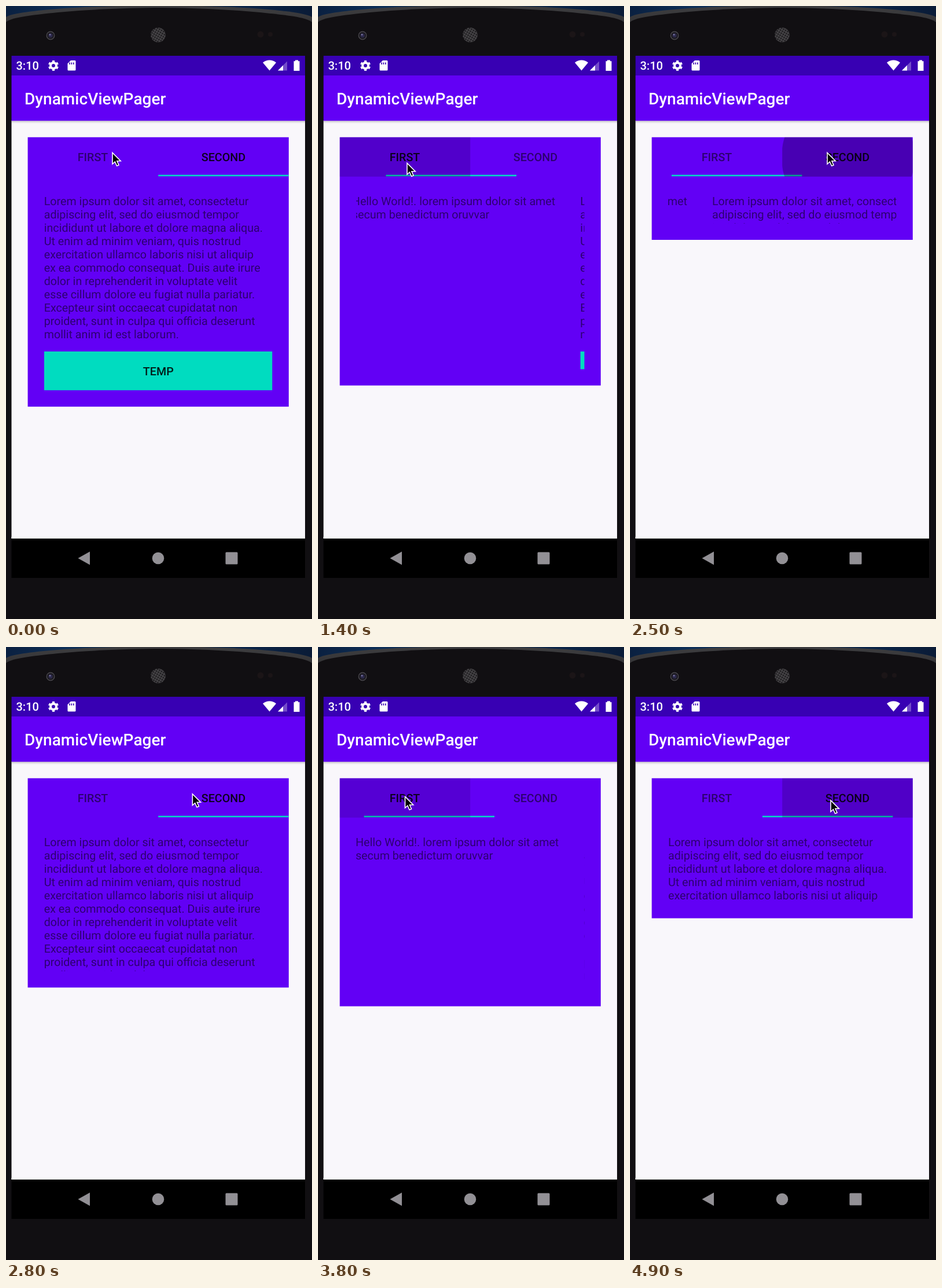
Animation, 529 px wide and 1059 px high, one loop 5000 ms. Source, as an HTML page:

```html
<!DOCTYPE html>
<html lang="en">
<head>
<meta charset="utf-8">
<title>Dynamic pager</title>
<style>
  html, body { margin: 0; width: 100%; height: 100%; overflow: hidden; background: #110f12; }
  svg { display: block; width: 100vw; height: 100vh; }
  text { font-family: Roboto, sans-serif; font-size: 19.7px; text-rendering: geometricPrecision; }
  .medium { font-weight: 500; }
  .body { fill: #000; fill-opacity: .54; }
</style>
</head>
<body>
<svg viewBox="0 0 529 1059">
  <defs>
    <linearGradient id="sky">
      <stop offset="0" stop-color="#0a2040"/><stop offset=".2" stop-color="#0e3058"/>
      <stop offset=".8" stop-color="#0b2548"/><stop offset="1" stop-color="#0a1b36"/>
    </linearGradient>
    <linearGradient id="rim" x2="0" y2="1">
      <stop offset="0" stop-color="#3e3e40"/><stop offset="1" stop-color="#2b2a2d"/>
    </linearGradient>
    <linearGradient id="shadow" x2="0" y2="1">
      <stop offset="0" stop-opacity=".2"/><stop offset="1" stop-opacity="0"/>
    </linearGradient>
    <pattern id="mesh" width="4" height="4" patternUnits="userSpaceOnUse" patternTransform="rotate(30)">
      <rect width="4" height="4" fill="#454346"/><circle cx="2" cy="2" r="1.3" fill="#161517"/>
    </pattern>
    <clipPath id="pagerClip"><rect id="pagerBox" x="66" y="323" width="394.5"/></clipPath>
    <clipPath id="tabClip"><rect id="tabBox" y="226.7" width="225.6" height="68"/></clipPath>
  </defs>

  <!-- device -->
  <rect width="529" height="30" fill="url(#sky)"/>
  <path d="M0 19C12 12 50 8 100 4Q180 -1 264 -1T429 4C479 8 517 12 529 19V60H0Z" fill="url(#rim)"/>
  <path d="M0 28C8 20 40 16 90 11Q180 3 264 3T439 11C489 16 521 20 529 28V1059H0Z" fill="#110f12"/>
  <circle cx="77" cy="51" r="6.8" fill="#1d1b22" stroke="#504e53" stroke-width="1.2"/>
  <circle cx="77" cy="51" r="3.6" fill="#2d2a4c"/>
  <circle cx="76" cy="49.5" r="1.3" fill="#8480ae"/>
  <circle cx="263" cy="50" r="12.8" fill="url(#mesh)"/>
  <g fill="#1b1517"><circle cx="440" cy="49" r="5.5"/><circle cx="457" cy="49" r="4"/></g>

  <!-- screen -->
  <rect x="9.5" y="86" width="507.5" height="902"/>
  <rect x="9.5" y="198" width="507.5" height="722" fill="#f9f7fb"/>
  <rect x="9.5" y="917" width="507.5" height="3" fill="#fff"/>
  <rect x="9.5" y="198" width="507.5" height="5" fill="url(#shadow)"/>
  <rect x="9.5" y="120" width="507.5" height="78.3" fill="#6200f5"/>
  <rect x="9.5" y="86" width="507.5" height="34" fill="#3800b3"/>
  <text class="medium" x="32" y="169.7" fill="#fff" style="font-size:28.1px">DynamicViewPager</text>

  <g fill="#fff">
    <text class="medium" x="17.5" y="110.3" style="font-size:20px">3:10</text>
    <g fill="none" stroke="#fff">
      <circle cx="82" cy="103" r="5" stroke-width="4"/>
      <circle cx="82" cy="103" r="7.6" stroke-width="3" pathLength="12" stroke-dasharray="1 1" stroke-dashoffset="-.5"/>
    </g>
    <path d="M112 94H119Q120.500 94 120.500 95.500V110Q120.500 111.500 119 111.500H108Q106.500 111.500 106.500 110V99.500Z"/>
    <path d="M110 97.500v3.500m3.400-3.500v3.500m3.400-3.500v3.500" stroke="#3800b3" stroke-width="1.600"/>
    <path d="M455.500 111.500L444 97.700Q455.500 89.500 467 97.700Z"/>
    <path d="M470 111.500L486 95.500V111.500Z" opacity=".3"/>
    <path d="M470 111.500L479 102.500V111.500Z"/>
    <path d="M500 93.500H505V95.300H507.500V112H497.500V95.300H500Z"/>
  </g>
  <g fill="#929095">
    <path d="M124.500 954L145 942.500V965.500Z"/>
    <circle cx="263" cy="954" r="10.300"/>
    <rect x="379.500" y="943.500" width="21" height="21" rx="1.500"/>
  </g>

  <!-- card -->
  <rect id="card" x="37.6" y="226.7" width="451.2" fill="#6200f5"/>
  <rect id="indicator" y="291.6" width="225.6" height="2.6" fill="#03dac5"/>
  <circle id="ripple" cy="261" clip-path="url(#tabClip)"/>
  <g class="medium" text-anchor="middle">
    <text class="tab" x="150" y="268.3">FIRST</text>
    <text class="tab" x="376" y="268.3">SECOND</text>
  </g>
  <g clip-path="url(#pagerClip)">
    <g id="firstPage" class="body"></g>
    <g id="secondPage">
      <g id="prose" class="body"></g>
      <rect x="66" y="596.8" width="394.5" height="67" fill="#00dcc0"/>
      <text class="medium" x="263.3" y="637.8" text-anchor="middle" fill-opacity=".87">TEMP</text>
    </g>
  </g>

  <path id="cursor" d="M1 1.500V21L5.400 17L8.600 24.300L12 22.800L8.900 15.800H15.200Z" stroke="#fff" stroke-width="1.600"/>
</svg>

<script>
const LOOP = 5000, STEP = 100;
const PAGE_WIDTH = 394.5, TAB_WIDTH = 225.6;
const CARD_LEFT = 37.6, CARD_TOP = 226.7, PAGER_TOP = 323, PADDING = 28.2;
const SHORT = 404, TALL = 692.2;
const $ = id => document.getElementById(id);

// press: ripple starts; at: page and indicator move; grow: card resizes
const clicks = [
  { press: 1120, at: 1275, grow: 1284, to: 0 },
  { press: 2350, at: 2437, grow: 2505, to: 1 },
  { press: 3500, at: 3640, grow: 3634, to: 0 },
  { press: 4630, at: 4730, grow: 4743, to: 1 }
];

// time, x, y of the pointer tip
const pointer = [
  [0, 183, 252], [200, 158, 266], [800, 158, 266], [1000, 153, 270],
  [1900, 153, 270], [2300, 340, 252], [2700, 340, 252], [3200, 145, 257],
  [3600, 145, 257], [3900, 151, 257], [4200, 151, 257], [4600, 346, 263.5]
];

const clamp = v => Math.min(1, Math.max(0, v));
const mix = (a, b, k) => a + (b - a) * k;
const quintOut = k => 1 - (1 - k) ** 5;
const sine = k => (1 - Math.cos(Math.PI * k)) / 2;

// cubic-bezier(.4, 0, .2, 1)
function standard(k) {
  let lo = 0, hi = 1, u = k;
  for (let i = 0; i < 20; i++) {
    u = (lo + hi) / 2;
    const x = 1.2 * u * (1 - u) ** 2 + .6 * u * u * (1 - u) + u ** 3;
    if (x < k) lo = u; else hi = u;
  }
  return 3 * u * u - 2 * u ** 3;
}

// runs every click over a value that begins on the second page
const follow = (t, key, duration, ease) => clicks.reduce(
  (value, c) => t > c[key] ? mix(value, c.to, ease(clamp((t - c[key]) / duration))) : value, 1);

function addLines(parent, lines) {
  lines.forEach((line, i) => {
    const text = document.createElementNS('http://www.w3.org/2000/svg', 'text');
    text.setAttribute('x', 65.7);
    text.setAttribute('y', 343.8 + i * 23.05);
    text.textContent = line;
    parent.append(text);
  });
}

function set(id, attributes) {
  for (const name in attributes) $(id).setAttribute(name, attributes[name]);
}

function drawRipple(t) {
  const c = clicks.findLast(c => t >= c.press);
  const age = c ? t - c.press : Infinity;
  const left = CARD_LEFT + (c ? c.to : 0) * TAB_WIDTH;
  set('tabBox', { x: left });
  set('ripple', {
    cx: left + TAB_WIDTH / 2 + 1,
    r: mix(68, 119, standard(clamp(age / 225))),
    'fill-opacity': .27 * clamp(age / 75) * (1 - clamp((age - 225) / 150))
  });
}

function drawPointer(t) {
  const i = pointer.findLastIndex(p => t >= p[0]);
  const a = pointer[i], b = pointer[i + 1] || a;
  const k = sine(clamp((t - a[0]) / (b[0] - a[0] || 1)));
  set('cursor', { transform: `translate(${mix(a[1], b[1], k)} ${mix(a[2], b[2], k)})` });
}

function draw(t) {
  const page = follow(t, 'at', 225, quintOut);
  const tab = follow(t, 'at', 300, standard);
  const bottom = mix(SHORT, TALL, follow(t, 'grow', 500, sine));
  const selected = follow(t, 'at', 1, () => 1);

  set('card', { height: bottom - CARD_TOP });
  set('pagerBox', { height: bottom - PADDING - PAGER_TOP });
  set('indicator', { x: CARD_LEFT + TAB_WIDTH * tab });
  set('firstPage', { transform: `translate(${-PAGE_WIDTH * page} 0)` });
  set('secondPage', { transform: `translate(${PAGE_WIDTH * (1 - page)} 0)` });
  document.querySelectorAll('.tab').forEach((label, i) =>
    label.setAttribute('fill-opacity', i === selected ? .87 : .54));
  drawRipple(t);
  drawPointer(t);
}

addLines($('firstPage'), [
  'Hello World!. lorem ipsum dolor sit amet',
  'secum benedictum oruvvar'
]);
addLines($('prose'), [
  'Lorem ipsum dolor sit amet, consectetur',
  'adipiscing elit, sed do eiusmod tempor',
  'incididunt ut labore et dolore magna aliqua.',
  'Ut enim ad minim veniam, quis nostrud',
  'exercitation ullamco laboris nisi ut aliquip',
  'ex ea commodo consequat. Duis aute irure',
  'dolor in reprehenderit in voluptate velit',
  'esse cillum dolore eu fugiat nulla pariatur.',
  'Excepteur sint occaecat cupidatat non',
  'proident, sunt in culpa qui officia deserunt',
  'mollit anim id est laborum.'
]);

const start = performance.now();
function tick() {
  const t = (performance.now() - start) % LOOP;
  draw(Math.floor(t / STEP) * STEP);
  requestAnimationFrame(tick);
}
tick();
</script>
</body>
</html>
```
